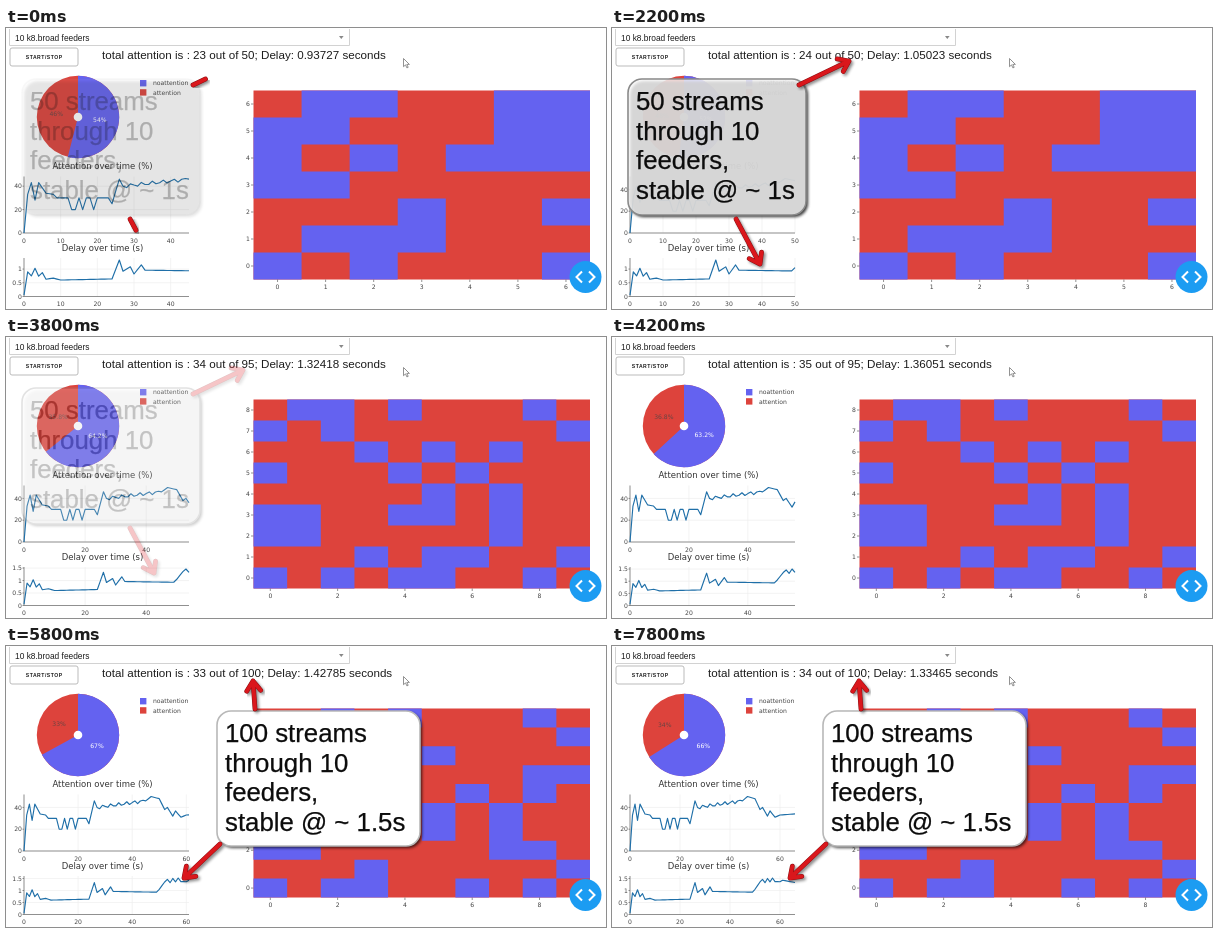
These frames come from a looping animation (600x281 px, 8000 ms). An HTML page:

```html
<!DOCTYPE html>
<html lang="en">
<head>
<meta charset="utf-8">
<title>Attention dashboard</title>
<style>
html, body { margin: 0; width: 100%; height: 100%; overflow: hidden; background: #fff; }
svg { display: block; width: 100vw; height: 100vh; }
text { font-family: "Liberation Sans", Arial, sans-serif; fill: #1c1c1c; }
.plot text { font-family: "DejaVu Sans", Verdana, sans-serif; font-size: 6.1px; fill: #444; }
.plot .title { font-size: 8.5px; fill: #333; }
.axis { stroke: #666; stroke-width: .7; fill: none; }
.grid { stroke: #eee; stroke-width: .7; fill: none; }
.line { stroke: #1f6fa8; stroke-width: 1.15; fill: none; stroke-linejoin: round; }
.note text { font-size: 25.8px; fill: #0c0c0c; stroke: #0c0c0c; stroke-width: .25; }
.mid { text-anchor: middle; }
.end { text-anchor: end; }
</style>
</head>
<body>
<svg viewBox="0 0 600 281" xmlns="http://www.w3.org/2000/svg">
  <defs>
    <filter id="soft" x="-10%" y="-10%" width="125%" height="125%"><feGaussianBlur stdDeviation="1.6"/></filter>
  </defs>
  <rect width="600" height="281" fill="#fff"/>
  <path d="M3.5 1V17.5H343.5V1" fill="none" stroke="#d2d2d2"/>
  <text x="9" y="12.6" font-size="8.4">10 k8.broad feeders</text>
  <path d="M333 8h4.6l-2.3 3z" fill="#888"/>
  <rect x="4" y="20" width="68" height="18" rx="2" fill="#fff" stroke="#bbb"/>
  <text class="mid" x="38.2" y="31.2" font-size="5.1" font-weight="bold" letter-spacing=".5">START/STOP</text>
  <text id="head" x="96" y="31" font-size="11.64"></text>
  <path d="M397.5 30.5v8.2l2-1.8 1.4 3 1.3-.6-1.4-2.9h2.6z" fill="#fff" stroke="#777" stroke-width=".8"/>
  <g id="plots" class="plot"></g>
  <circle cx="579.5" cy="249" r="16" fill="#1c9cf2"/>
  <path d="M576 243.5l-5.5 5.5 5.5 5.5M583 243.5l5.5 5.5-5.5 5.5" fill="none" stroke="#fff" stroke-width="2"/>
  <g id="notes"></g>
</svg>
<script>
const LOOP = 8000, STEP = 200;
const BLUE = '#6462f0', RED = '#dd433c';
const $ = id => document.getElementById(id);
const clamp = v => Math.max(0, Math.min(1, v));

// Straight lines through key points [x, y].
function track(keys) {
  return x => {
    const i = keys.findIndex(k => k[0] > x);
    if (i < 0) return keys[keys.length - 1][1];
    const [x0, y0] = keys[i - 1], [x1, y1] = keys[i];
    return y0 + (y1 - y0) * (x - x0) / (x1 - x0);
  };
}

const sampleAt = track([[0, 45], [200, 46], [2200, 50], [3200, 52], [4200, 56], [4800, 60], [5800, 61], [7800, 66]]);

const trend = track([[0, 0], [1, 33], [2, 43], [3, 28], [4, 43], [6, 34], [8, 33], [9, 30], [23, 30], [24, 25],
  [26, 46], [27, 40], [45, 46], [47, 50], [50, 48], [52, 38], [53, 40], [55, 32], [56, 36.8], [58, 31], [60, 33], [66, 34]]);
const dips = [13, 14, 16, 19];
const attention = i => trend(i) - (dips.includes(i) ? 10 : 0) + (i > 27 && i < 45 ? 1.6 * Math.sin(2.2 * i) : 0);

const delay = track([[0, .05], [1, .9], [2, .75], [3, 1.03], [4, .74], [5, .87], [6, .63], [8, .67], [10, .6],
  [24, .64], [26, 1.33], [27, .92], [29, 1.08], [30, .82], [32, 1.15], [33, .96], [45, .93727], [49, .93164],
  [50, 1.05023], [52, 1.35544], [53, 1.46207], [54, 1.32418], [55, 1.50133], [56, 1.36051], [57, 1.52074],
  [58, 1.37129], [60, 1.36514], [61, 1.42785], [66, 1.33465]]);

// Seat maps from the top row down; # is a blue cell.
const stages = [
  { from: 0, streams: 50, seats: '.##..## ##...## #.#.### ##..... ...#..# .###... #.#...#' },
  { from: 2600, streams: 60, seats: '####.... ...#.#.# ##..##.# ...#.... ...##... #....#.. #.#...#.' },
  { from: 3800, streams: 95, seats: '.##.#...#. #.#......# ...#.#.#.. #...#.#... .....#.#.. ##..##.#.. ##.....#.. ...#.##..# #.#.##..#.' },
  { from: 4400, streams: 100, seats: '..#.#...#. ...#.....# .#...#.... ...#....## #..#..#.#. .....#.#.. #....#.#.. ##.....##. ...#.....# #.##..#.#.' }
];

const notes = [
  { box: [16, 51, 178, 136], lines: ['50 streams', 'through 10', 'feeders,', 'stable @ ~ 1s'],
    arrows: [[187, 57, 237, 33], [124, 191, 148, 236]], cover: .8, shade: .8, edge: '#8a8a8a',
    start: -200, out: 3200 },
  { box: [211, 65, 203, 135], lines: ['100 streams', 'through 10', 'feeders,', 'stable @ ~ 1.5s'],
    arrows: [[249, 63, 247, 35], [214, 198, 178, 232]], cover: 1, shade: .7, edge: '#b8b8b8',
    start: 4200, out: LOOP }
];

const label = (x, y, s, cls = 'mid', more = '') => `<text class="${cls}" x="${x}" y="${y}" ${more}>${s}</text>`;

function pie(part, total) {
  const cx = 72, cy = 89, r = 41.2, share = 1 - part / total;
  const at = (turn, d) => [cx + d * Math.sin(turn * 2 * Math.PI), cy - d * Math.cos(turn * 2 * Math.PI)];
  const pct = v => +(v * 100).toPrecision(3) + '%';
  const [x, y] = at(share, r), [bx, by] = at(share / 2, 22), [rx, ry] = at((1 + share) / 2, 22);
  return `<circle cx="${cx}" cy="${cy}" r="${r}" fill="${RED}"/>
    <path d="M${cx} ${cy}V${cy - r}A${r} ${r} 0 ${share > .5 ? 1 : 0} 1 ${x} ${y}Z" fill="${BLUE}"/>
    <circle cx="${cx}" cy="${cy}" r="4.3" fill="#fff"/>` +
    label(bx, by + 2.2, pct(share), 'mid', 'style="fill:#fff"') +
    label(rx, ry + 2.2, pct(part / total), 'mid', 'opacity=".75"') +
    [['noattention', BLUE], ['attention', RED]].map(([s, c], i) =>
      `<rect x="134" y="${52 + i * 9.2}" width="6.4" height="6.4" fill="${c}"/>` +
      label(147, 57.3 + i * 9.2, s, '')).join('');
}

function chart(series, last, title, titleY, base, height, dy) {
  const left = 18, width = 165, top = base - height - 2;
  const values = Array.from({ length: last + 1 }, (_, i) => series(i));
  const sx = width / last, sy = height / Math.max(...values);
  const dx = last > 53 ? 20 : 10;
  let s = label(96.5, titleY, title, 'mid title');
  for (let v = 0; v <= last; v += dx) {
    const x = left + v * sx;
    s += `<path class="grid" d="M${x} ${top}V${base}"/>` + label(x, base + 9.6, v);
  }
  for (let v = 0; v * sy <= height + 1; v += dy) {
    const y = base - v * sy;
    s += `<path class="grid" d="M${left} ${y}h${width}"/><path class="axis" d="M${left - 1.5} ${y}h1.5"/>` +
      label(left - 2, y + 2.2, v, 'end');
  }
  const pts = values.map((v, i) => `${(left + i * sx).toFixed(2)},${(base - v * sy).toFixed(2)}`);
  return s + `<path class="axis" d="M${left} ${top}V${base}H${left + width}"/>
    <polyline class="line" points="${pts.join(' ')}"/>`;
}

function heat(rows) {
  const x0 = 247.5, y0 = 62.5, w = 336.5, h = 189;
  const cols = rows[0].length, ch = h / rows.length, cw = w / cols;
  const skipX = cols > 8 ? 2 : 1, skipY = rows.length > 9 ? 2 : 1;
  let d = '', s = '';
  rows.forEach((row, r) => {
    [...row].forEach((c, i) => {
      if (c === '#') d += `M${x0 + i * cw} ${y0 + r * ch}h${cw}v${ch}h${-cw}z`;
    });
    const n = rows.length - 1 - r, y = y0 + (r + .5) * ch;
    if (n % skipY === 0) s += label(244, y + 2.2, n, 'end') + `<path class="axis" d="M245 ${y}h2.5"/>`;
  });
  for (let i = 0; i < cols; i += skipX) {
    const x = x0 + (i + .5) * cw;
    s += label(x, 261.3, i) + `<path class="axis" d="M${x} 251.5v2.5"/>`;
  }
  return `<rect x="${x0}" y="${y0}" width="${w}" height="${h}" fill="${RED}"/><path d="${d}" fill="${BLUE}"/>` + s;
}

function arrow([x1, y1, x2, y2], p) {
  const a = Math.atan2(y2 - y1, x2 - x1);
  let d = `M${x1} ${y1}L${x1 + (x2 - x1) * p} ${y1 + (y2 - y1) * p}`;
  if (p === 1) {
    const barb = k => `${x2 - 12 * Math.cos(a + k)} ${y2 - 12 * Math.sin(a + k)}`;
    d += `M${barb(.62)}L${x2} ${y2}L${barb(-.62)}`;
  }
  const stroke = (color, width, more = '') => `<path d="${d}" fill="none" stroke-linecap="round"
    stroke-linejoin="round" stroke="${color}" stroke-width="${width}" ${more}/>`;
  return stroke('#000', 4.5, 'opacity=".45" filter="url(#soft)" transform="translate(2 2)"') +
    stroke('#8c1014', 4.8) + stroke('#da171c', 3.8);
}

function note(n, t) {
  const p = clamp((t - n.start) / 800), fade = 1 - clamp((t - n.out) / 800);
  if (!p || !fade) return '';
  const [x, y, w, h] = n.box;
  const rect = more => `<rect x="${x}" y="${y}" width="${w}" height="${h}" rx="14" ${more}/>`;
  const lines = n.lines.map((s, i) => label(x + 8, y + 31 + i * 29.6, s, ''));
  return `<g class="note" opacity="${fade}">` +
    rect(`fill="#000" opacity="${n.shade * p ** 1.5}" filter="url(#soft)" transform="translate(2 2)"`) +
    rect(`fill="#fff" opacity="${n.cover * p * p}"`) +
    rect(`fill="none" stroke="${n.edge}" stroke-width="1.6" opacity="${p * p}"`) +
    `<g opacity="${p}">${lines.join('')}</g>` +
    n.arrows.map(a => arrow(a, p)).join('') + '</g>';
}

function draw(t) {
  const { streams, seats } = stages.filter(s => s.from <= t).pop();
  const last = Math.floor(sampleAt(t) + 1e-6);
  const part = Math.round(attention(last) * streams / 100);
  $('head').textContent = `total attention is : ${part} out of ${streams}; Delay: ${delay(last).toFixed(5)} seconds`;
  $('plots').innerHTML = pie(part, streams) +
    chart(attention, last, 'Attention over time (%)', 141, 205, 54.5, 20) +
    chart(delay, last, 'Delay over time (s)', 223, 268.5, 36.5, .5) +
    heat(seats.split(' '));
  $('notes').innerHTML = notes.map(n => note(n, t)).join('');
}

let shown = -1;
const began = performance.now();
function tick() {
  const t = Math.floor((performance.now() - began) % LOOP / STEP) * STEP;
  if (t !== shown) draw(shown = t);
  requestAnimationFrame(tick);
}
tick();
</script>
</body>
</html>
```
